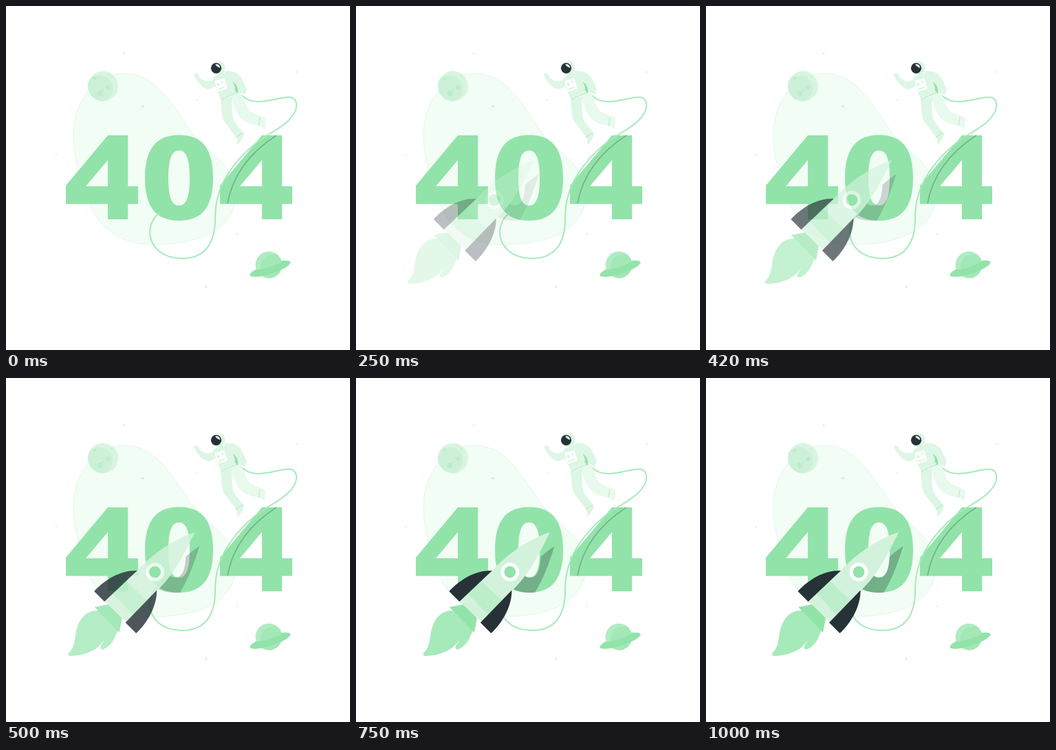
Write an HTML page that moves like this. It is 500 px wide and 500 px high and loops after 1040 ms.

```html
<!DOCTYPE html>
<html lang="en">
<head>
<meta charset="utf-8">
<title>404</title>
<style>
  html, body { margin: 0; width: 100%; height: 100%; overflow: hidden; background: #fff; }
  svg { display: block; width: 100%; height: 100%; }
  .green { fill: #92e3a9; }
  .mid { fill: #a6eaba; }
  .lit { fill: #b0ecc2; }
  .shade { fill: #a3e8b6; }
  .dark { fill: #263238; }
  .suit { fill: #def6e5; }
  .pale { fill: #e8f9ed; }
  .white { fill: #fff; }
  .line { fill: none; stroke-linecap: round; }
</style>
</head>
<body>
<svg viewBox="0 0 500 500">
  <defs>
    <path id="four" fill-rule="evenodd" d="M148 310V287.700H87V261L148 188H177.200V262H192V287.700H177.200V310ZM148 224L116 262H148Z"/>
    <path id="zero" fill-rule="evenodd" clip-rule="evenodd" d="M251.5 187.5C286 187.5 301 208 301 250C301 292 285 312 251.5 312C217 312 202 291 202 250C202 208 218 187.5 251.5 187.5Z
      M251.5 210C241 210 236 222 236 250C236 278 241 290 251.5 290C262 290 267 278 267 250C267 222 262 210 251.5 210Z"/>
    <clipPath id="inZero"><use href="#zero"/></clipPath>
    <path id="hull" d="M280 224C246 236 218 256 195 281L148 324L181 355L225 309C246 289 261 264 280 224Z"/>
    <clipPath id="inHull"><use href="#hull"/></clipPath>
    <clipPath id="inMoon"><circle cx="141" cy="116.5" r="22"/></clipPath>
    <clipPath id="inPlanet"><circle cx="382" cy="376.3" r="19.3"/></clipPath>
  </defs>

  <path fill="#f2fdf5" stroke="#cdeed8" stroke-width=".5" d="M172 98C203 98 222 117 238 138C256 161 268 184 284 200C308 221 334 240 334 272C334 318 296 346 214 347C170 347 138 326 121 287C111 254 98 228 98 187C98 140 128 98 172 98Z"/>

  <g fill="#dde8e1">
    <circle cx="171" cy="69" r="1.4"/>
    <circle cx="422.5" cy="96" r="1.2"/>
    <circle cx="278" cy="137" r="1"/>
    <circle cx="73" cy="216" r="1.1"/>
    <circle cx="199" cy="145.7" r="1.8" fill="#d3ebdb"/>
    <circle cx="336" cy="332" r="1.1"/>
    <circle cx="291" cy="408" r="1.6"/>
  </g>

  <!-- moon -->
  <circle cx="141" cy="116.5" r="22" fill="#d9f5e1"/>
  <g clip-path="url(#inMoon)">
    <circle cx="136" cy="120" r="19.5" fill="#cdf1d8"/>
    <g fill="#bdecca">
      <circle cx="129" cy="105" r="2.6"/>
      <circle cx="148" cy="118" r="3.5"/>
      <circle cx="136.5" cy="127" r="4"/>
      <circle cx="141" cy="122.5" r="1.4"/>
      <circle cx="153" cy="103" r="2" fill="#cdf1d8"/>
    </g>
  </g>

  <!-- ringed planet -->
  <circle class="lit" cx="382" cy="376.3" r="19.3"/>
  <circle class="shade" cx="388" cy="379" r="18" clip-path="url(#inPlanet)"/>
  <ellipse class="green" cx="384" cy="381.8" rx="31" ry="7.3" transform="rotate(-18 384 381.8)"/>
  <g clip-path="url(#inPlanet)">
    <path class="lit" d="M360 355H405V369Q386 381 360 384Z"/>
    <path class="shade" d="M370 382.500C369 371 376 361 390 361L405 362V369Q388 380 370 382.500Z"/>
  </g>

  <g class="green">
    <use href="#four"/>
    <use href="#zero"/>
    <use href="#four" x="224"/>
  </g>

  <!-- tether and its shadow -->
  <path class="line" stroke="#74b58c" stroke-width="1.8" style="stroke-linecap:butt" d="M393 188C353 214 329 248 322 287"/>
  <path class="line" stroke="#a6eaba" stroke-width="2" d="M338 126C350 137 356 139 368 139C388 138 398 133 410 132.5C419 132 423 138 422 147C420 163 400 176 383 186C353 203 325 234 313 262C306 280 304 292 304 312C303 346 289 367 255 367C224 366 209 348 209 328C210 314 216 306 223 301"/>

  <!-- astronaut -->
  <path class="green" d="M327 108C336 111 339 119 337 128L328 126Z"/>
  <path class="pale" d="M326 131L340 124C346 133 348 146 355 153L377 163L376 180C372 174 369 174 363 173C347 170 340 164 334 152Z"/>
  <path class="suit" d="M312 137L328 131C329 145 327 158 332 168L346 186C344 194 341 196 337 202C335 198 338 195 334 190L318 169C312 160 314 149 312 137Z"/>
  <path class="line" stroke="#bdecca" stroke-width="1.2" d="M334 191L344 184M369 162L367 174"/>
  <path class="suit" d="M303 107C296 109 293 110 289 109L281 104C281 100 279 98 275 98C272 98 273 101 275 104C279 111 285 119 293 121C300 121 304 117 306 112Z"/>
  <path class="suit" d="M317 95C329 93 339 98 343 106L350 121L347 129L336 123L326 109Z"/>
  <path class="suit" d="M301 105C307 99 318 95 324 99C332 106 337 115 338 124L313 137C309 127 303 116 301 105Z"/>
  <path class="line" stroke="#bdecca" stroke-width="1.2" d="M313 136L337 125"/>
  <path class="green" d="M329 110C335 113 338 119 337 127L333 123C333 117 332 114 329 110Z"/>
  <path class="white" d="M303 109L317 105L322 120L308 125Z"/>
  <path class="line" stroke="#c3eecf" stroke-width="1.2" d="M309 121L317 118M314 109L315 112"/>
  <circle cx="308.5" cy="114" r="2" fill="#d3f2dc"/>
  <circle class="pale" cx="308" cy="90" r="10.3"/>
  <path fill="#d9f5e1" d="M309 80C317 81 320 89 317 95C314 99 310 101 305 100C314 97 315 88 309 80Z"/>
  <circle class="dark" cx="305.5" cy="90.3" r="7.6"/>
  <path class="white" d="M304 85C308 83.500 311 86 311 90C309 89.500 306 87.500 304 85Z"/>

  <g id="rocket" opacity="0">
    <path clip-path="url(#inZero)" fill="#263238" fill-opacity=".29" d="M286.5 244.5C280 266 271 292 257 314H215L222 298L250 278C258 268 268 257 286.5 244.5Z"/>
    <path class="mid" d="M140 338C122 337 111 350 107 370C105 386 103 394 96 400C95 403 97 404 100 404C118 403 137 398 148 381C147 385 142 388 143 393C145 398 156 390 161 382C165 375 167 369 169 364Z"/>
    <path class="green" d="M134 333L155 329L174 349L170 370Z"/>
    <use href="#hull" fill="#d3f2dc"/>
    <path clip-path="url(#inHull)" fill="#bdeecb" d="M158 311L178 293L214 327L193 347Z"/>
    <path class="dark" d="M133.500 310C150 292 173 279 196 280L148.500 325Z"/>
    <path class="dark" d="M224.5 308.5C225 330 212 355 194.5 371L179 355.5Z"/>
    <circle class="white" cx="222" cy="282" r="13.4"/>
    <circle class="green" cx="222" cy="282" r="8.4"/>
  </g>
</svg>
<script>
  const LOOP = 1040, FPS = 24, SLIDE = 30;
  const rocket = document.getElementById('rocket');

  const cubic = (a, b, s) => 3 * (1 - s) ** 2 * s * a + 3 * (1 - s) * s * s * b + s ** 3;

  // cubic-bezier(.36, -.01, .5, 1.38), solved by bisection
  function ease(x) {
    if (x >= 1) return 1;
    let lo = 0, hi = 1;
    for (let i = 0; i < 30; i++) {
      const s = (lo + hi) / 2;
      if (cubic(.36, .5, s) < x) lo = s; else hi = s;
    }
    return cubic(-.01, 1.38, lo);
  }

  // The slide advances in film steps, and the first two stay empty.
  function draw(ms) {
    const step = Math.min(24, Math.floor((ms + 5) * FPS / 1000));
    const p = ease((step + 1) / FPS);
    rocket.setAttribute('opacity', step < 2 ? 0 : Math.min(1, p));
    rocket.setAttribute('transform', `translate(${SLIDE * (p - 1)} 0)`);
  }

  let start;
  function tick(now) {
    start ??= now;
    draw((now - start) % LOOP);
    requestAnimationFrame(tick);
  }
  requestAnimationFrame(tick);
</script>
</body>
</html>
```
